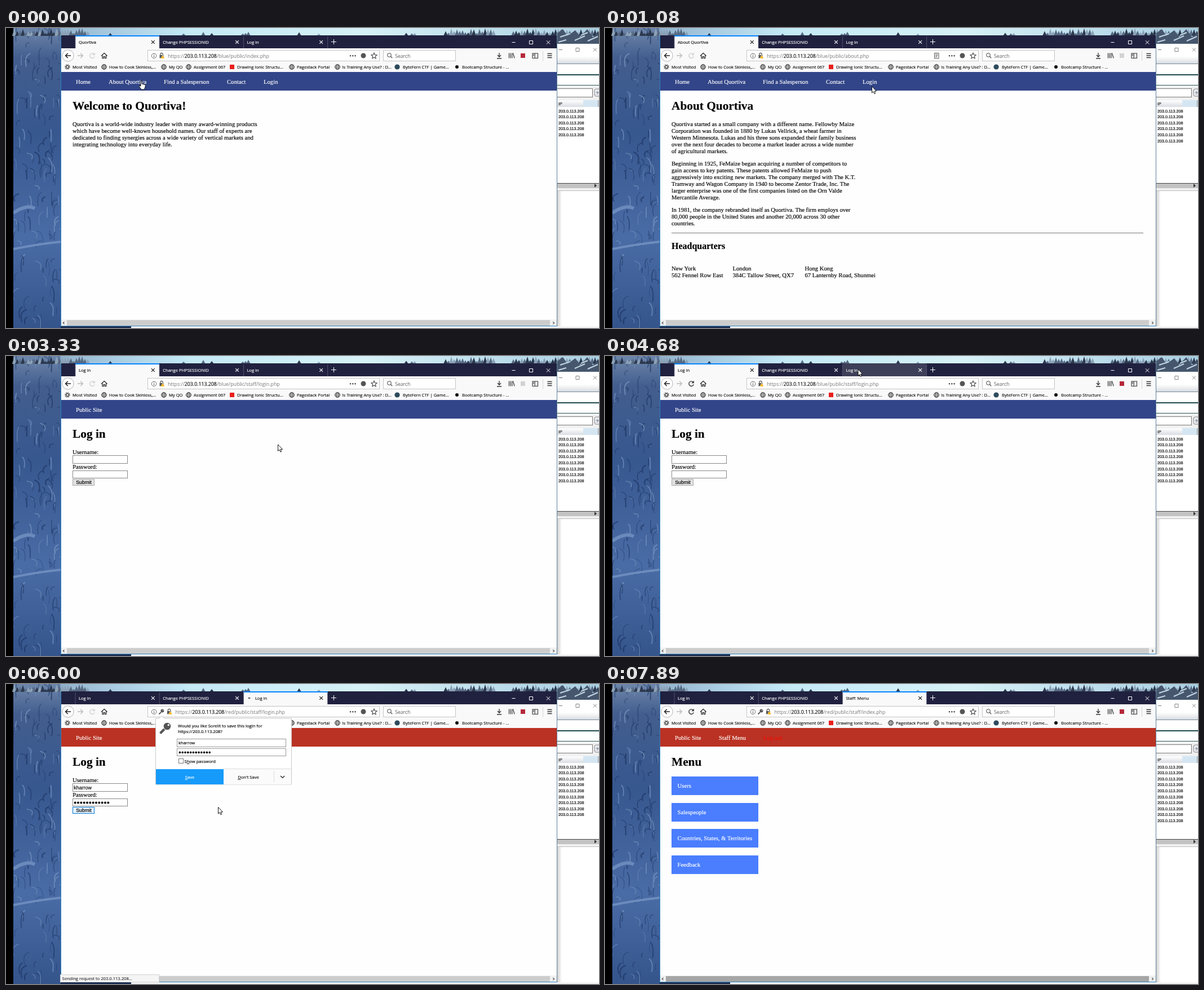
An HTML page that plays this animation: 1052 by 532 pixels, repeating every 8000 ms.

```html
<!DOCTYPE html>
<html lang="en">
<head>
<meta charset="utf-8">
<title>Browser session</title>
<style>
html, body { margin: 0; width: 100%; height: 100%; overflow: hidden; background: #000; }
svg { display: block; width: 1052px; height: 532px; }
text { white-space: pre; stroke-width: .16px; }
.ui { font: 7.6px "Open Sans", sans-serif; }
.url { font: 8.75px "Open Sans", sans-serif; }
.page { font: 10.67px "Liberation Serif", serif; }
.h1 { font: bold 21.33px "Liberation Serif", serif; }
.h2 { font: bold 16px "Liberation Serif", serif; }
.form { font: 8.89px "Liberation Sans", sans-serif; }
.row { font: 7.2px "Liberation Sans", sans-serif; }
</style>
</head>
<body>
<svg viewBox="0 0 1052 532" xmlns="http://www.w3.org/2000/svg">
  <defs>
    <linearGradient id="snow" x2="0" y2="1">
      <stop offset="0" stop-color="#6d86ab"/><stop offset=".1" stop-color="#435e8e"/>
      <stop offset=".35" stop-color="#37578f"/><stop offset=".7" stop-color="#4a6ca6"/>
      <stop offset="1" stop-color="#34548b"/>
    </linearGradient>
    <linearGradient id="sky">
      <stop offset="0" stop-color="#7e9bb8"/><stop offset=".15" stop-color="#a3c6dd"/>
      <stop offset=".3" stop-color="#c4eaf6"/><stop offset=".6" stop-color="#d6f1f7"/>
      <stop offset="1" stop-color="#a9cfe2"/>
    </linearGradient>
    <linearGradient id="head" x2="0" y2="1">
      <stop offset="0" stop-color="#fff"/><stop offset="1" stop-color="#d9dde2"/>
    </linearGradient>
    <linearGradient id="shade">
      <stop offset="0" stop-color="#cfcfcf"/><stop offset="1" stop-color="#fff"/>
    </linearGradient>
    <clipPath id="wood"><rect x="13" width="84" height="532"/></clipPath>
  </defs>
  <g id="back"></g>
  <g id="view"></g>
  <g id="cursor"></g>
</svg>
<script>
const LOOP = 8000, HOST = "203.0.113.208", BRAND = "Quortiva";
const $ = id => document.getElementById(id);

const rect = (x, y, w, h, fill, more = "") =>
  `<rect x="${x}" y="${y}" width="${w}" height="${h}" fill="${fill}" ${more}/>`;
const box = (x, y, w, h, fill, line) => rect(x, y, w, h, fill, `stroke="${line}" stroke-width="1"`);
const path = (d, line, width = 1, fill = "none") =>
  `<path d="${d}" fill="${fill}" stroke="${line}" stroke-width="${width}"/>`;
const disc = (x, y, r, fill, line = "none", width = 1) =>
  `<circle cx="${x}" cy="${y}" r="${r}" fill="${fill}" stroke="${line}" stroke-width="${width}"/>`;
const text = (cls, x, y, s, fill = "#000", more = "") =>
  `<text class="${cls}" x="${x}" y="${y}" fill="${fill}" stroke="${fill}" ${more}>${s}</text>`;
const cross = (x, y, r, line, width = 1.1) =>
  path(`M${x - r} ${y - r}l${2 * r} ${2 * r}m0 ${-2 * r}l${-2 * r} ${2 * r}`, line, width);
const lines = (x, y, list) => list.map((s, i) => text("page", x, y + i * 12, s)).join("");

// ---- desktop behind the browser
function random(seed) {
  return () => (seed = (seed * 16807) % 2147483647) / 2147483647;
}

function desktop() {
  const rnd = random(77), pick = list => list[Math.floor(rnd() * list.length)];
  let s = rect(13, 0, 1039, 532, "url(#sky)") + rect(13, 0, 84, 532, "url(#snow)");
  // snowy twigs
  s += '<g clip-path="url(#wood)" opacity=".55">';
  for (let i = 0; i < 150; i++) {
    const x = 10 + rnd() * 85, y = rnd() * 530 - 10, w = rnd() * 30 - 15, h = 6 + rnd() * 22;
    s += path(`M${x} ${y}q${w} ${h * .2} ${w * .6} ${h}`, pick(["#162a55", "#203a6c", "#86a2cc"]), .8 + rnd() * 1.4);
  }
  s += path("M13 392Q52 384 97 379", "#8ba8d4", 4) + path("M13 328q24-16 38-8", "#8ba8d4", 6) + "</g>";
  // tree tops
  for (let x = 15; x < 1052; x += 5) {
    const thick = x < 150 || x > 775 && x < 870 || x > 898;
    if (!thick && rnd() > .06) continue;
    const h = thick ? 5 + rnd() * 9 : 4 + rnd() * 4;
    s += path(`M${x - 4} 14L${x} ${14 - h}l4 ${h}z`, "none", 0, pick(["#2c394e", "#566a82", "#8ba1b6"]));
  }
  s += path("M978 28V9l10-7 8 12 14-10 9 12 12-14 10 14 11-8V28z", "none", 0, "#46576d");
  s += path("M983 16l18-6m8 12l18-8m5 9l18-8M980 25l14-4m26-8l12-5", "#c3d6e5", 2);

  // second window
  s += rect(978, 28, 74, 504, "#fff") + path("M981 38.5h6", "#777", 1) + path("M1011 35.5h6v6h-6z", "#777", .9) + cross(1045, 38.5, 3, "#777", .9);
  s += rect(978, 50, 74, 13, "url(#head)") + rect(978, 63, 74, 1, "#789") + rect(978, 82, 74, 2, "#1f4a4b");
  s += rect(978, 101, 74, 1, "#1f4a4b") + rect(978, 103, 74, 25, "#f0f0f0") + box(970.5, 107.5, 70, 15, "#fff", "#777");
  s += `<rect x="1044" y="108" width="14" height="13" rx="3" fill="#e8eaf0" stroke="#888"/>` + text("row", 1047, 118, "?", "#345");
  s += rect(978, 128, 74, 12, "url(#head)") + rect(1024, 128, 28, 12, "#d5e6f3") + path("M1050.5 128v12", "#999", 1);
  s += text("row", 980, 137, "IP", "#222") + rect(978, 275, 74, 1, "#444") + rect(978, 276, 74, 8, "#c3c3c3");
  s += path("M1044 276l4 3.5-4 3.5z", "none", 0, "#333") + rect(978, 284, 74, 4, "#f0f0f0") + rect(978, 288, 74, 1, "#bbb");
  return s + rect(978, 289, 8, 243, "url(#shade)") + rect(97, 529, 125, 3, "#1d2f52") + rect(222, 529, 830, 3, "#f3f3f3");
}

// ---- browser frame
const globe = x => disc(x, 69, 4.4, "none", "#333", 1) +
  `<ellipse cx="${x}" cy="69" rx="2" ry="4.4" fill="none" stroke="#333" stroke-width=".8"/>` +
  path(`M${x - 4.4} 69h8.8m-7.8-2.2h6.8m-6.8 4.4h6.8`, "#333", .7);
const gear = x => disc(x, 69, 2.4, "none", "#333", 1.2) +
  `<circle cx="${x}" cy="69" r="4" fill="none" stroke="#333" stroke-width="1.5" stroke-dasharray="1.4 1.74"/>`;
const square = x => rect(x - 4, 65, 8, 8, "#e8201c");

const BOOKMARKS = [
  [109, 118, "Most Visited", gear], [174, 183, "How to Cook Skinless,...", globe],
  [280, 289, "My QO", globe], [324, 333, "Assignment 067", globe],
  [401, 410, "Drawing Ionic Structu...", square], [507, 516, "Pagestack Portal", globe],
  [588, 596.5, "Is Training Any Use? : D...", globe],
  [694, 704, "ByteFern CTF | Game...", x => disc(x, 69, 4.6, "#2d4a5c")],
  [800, 809, "Bootcamp Structure - ...", x => disc(x, 69, 3, "#111")]
];

function tabs(v) {
  let s = rect(97, 13, 880, 23, "#20213f");
  v.titles.forEach((title, i) => {
    const x = 123 + i * 149.2, on = i === v.tab;
    if (on) s += rect(x, 13, 149, 23, "#f9f9fa") + rect(x, 13, 149, 2, "#0a84ff");
    else if (i === v.hover) s += rect(x, 13, 149, 23, "#3d3e58");
    const ink = on ? "#111" : "#fff", busy = on && v.busy;
    if (busy) s += `<rect x="${x + 8 + v.spin}" y="24" width="4" height="1.8" rx=".9" fill="#333"/>`;
    s += text("ui", x + (busy ? 20.5 : 6), 28, title, ink) + cross(x + 137.8, 25, 2.9, ink);
  });
  s += path("M123 15v21M272.2 15v21M421.4 15v21M570.6 15v21", "#5d5e79", .8);
  return s + path("M577 24.5h9m-4.5-4.5v9M897.5 25.5h6", "#fff", 1) +
    path("M928.5 22.5h6v6h-6z", "#fff", 1) + cross(962, 25.5, 3.2, "#fff", 1);
}

function reloadIcon(mode) {
  if (mode === "stop") return cross(153, 49, 4, "#333", 1.4);
  const c = mode === "dim" ? "#d0d0d2" : "#333";
  return path("M156.4 46.3A4.3 4.3 0 1 0 157.2 50.6", c, 1.4) + path("M157.8 43.8v4.4h-4.4z", "none", 0, c);
}

const keyIcon = (x, y, k) => `<g transform="translate(${x} ${y}) scale(${k})">` +
  path("M-1 1L-4.5 4.5", "#555", 2) + disc(1.4, -1.4, 3, "#555") + disc(2.5, -2.5, .8, "#fff") + "</g>";
const lockIcon = x => path(`M${x - 2.2} 48v-1.5a2.2 2.2 0 0 1 4.4 0V48`, "#555", 1.2) +
  rect(x - 3.5, 48, 7, 5.5, "#555") + path(`M${x + 2} 48l3.6 6h-7.2z`, "#fff", .4, "#f5b31a");

function toolbar(v) {
  let s = rect(97, 36, 880, 42, "#f9f9fa");
  s += disc(110, 49, 10.2, "#fff", "#b5b5b8", 1) + path("M115 49h-9.5m4.3-4.3L105.5 49l4.3 4.3", "#222", 1.5);
  s += path("M127 49h9.5m-4.3-4.3l4.3 4.3-4.3 4.3", "#bbb", 1.3) + reloadIcon(v.reload);
  s += path("M169 49.5l5.3-5 5.3 5M171 48.5v5.2h2.2v-3h2.3v3h2.2v-5.2", "#333", 1.3);
  s += box(251.5, 39.5, 411, 19, "#fff", "#c4c4c6") + box(669.5, 39.5, 128, 19, "#fff", "#c4c4c6");
  s += disc(262.5, 49.3, 4.2, "none", "#555", .9) + path("M262.5 48.5v3.2m0-5.2v1.1", "#555", 1.1);
  const shift = v.tab === 2 ? 13.5 : 0;
  if (shift) s += keyIcon(276, 49, 1);
  s += lockIcon(276 + shift);
  const grey = c => `<tspan fill="#777" stroke="none">${c}</tspan>`;
  s += text("url", 287 + shift, 53, grey("https://") + HOST + grey(v.path), "#0c0c0d");
  if (v.page === "about") s += path("M584.5 44.5h7.5v9.5h-7.5zM586 47h4.5m-4.5 2.2h4.5M586 51.4h3", "#555", 1);
  s += [611, 615.3, 619.6].map(x => disc(x, 49.2, 1.2, "#444")).join("") + disc(634, 49, 4.5, "#555");
  s += path("M653 44.2l1.5 3.3 3.6.4-2.7 2.4.8 3.6-3.2-1.9-3.2 1.9.8-3.6-2.7-2.4 3.6-.4z", "#444", 1.1);
  s += disc(680, 48, 3.2, "none", "#555", 1.1) + path("M682.3 50.3l3 3", "#555", 1.3) + text("url", 690, 53, "Search", "#777");
  s += path("M875 44v7m-3-3l3 3.2 3-3.2M871 54h8", "#333", 1.3);
  s += path("M892.5 44.5v9m2.7-9v9m2.7-9v9m1.6-9l2.6 9", "#333", 1.2);
  s += rect(913, 45, 8, 8, v.dimExt ? "#d2d2d4" : "#b5283a");
  s += path("M934 45h9.5v8.5H934zm4.2 0v8.5M935 47h2m-2 2h2", "#333", 1.1) + path("M952.5 41v17", "#ccc", .8);
  s += path("M960.5 45.5h8m-8 3.5h8m-8 3.5h8", "#333", 1.3);
  return s + BOOKMARKS.map(([x, tx, label, icon]) => icon(x) + text("ui", tx, 72, label, "#111")).join("");
}

function scrollbar(v) {
  return rect(97.5, 517, 879.5, 11.7, "#f0f0f0") + rect(108, 518, 857, 10, v.drag ? "#a6a6a6" : "#cdcdcd") +
    path("M103.5 520.8l-2.3 2.2 2.3 2.2M970.3 520.8l2.3 2.2-2.3 2.2", "#444", 1.1);
}

// ---- pages
const BLUE = "#324588", RED = "#ba3223";
const menuBar = (color, items) => rect(97, 78, 880, 33, color) +
  items.map(([x, s, c = "#fff"]) => text("page", x, 99, s, c)).join("");
const site = () => menuBar(BLUE, [[124, "Home"], [182, "About " + BRAND], [280, "Find a Salesperson"], [392, "Contact"], [457, "Login"]]);
const title = s => text("h1", 118, 145, s);

const PAGES = {
  home: () => site() + title(`Welcome to ${BRAND}!`) + lines(118, 174, [
    BRAND + " is a world-wide industry leader with many award-winning products",
    "which have become well-known household names. Our staff of experts are",
    "dedicated to finding synergies across a wide variety of vertical markets and",
    "integrating technology into everyday life."]),

  about: () => site() + title("About " + BRAND) + lines(118, 174, [
    BRAND + " started as a small company with a different name. Fellowby Maize",
    "Corporation was founded in 1880 by Lukas Vellrick, a wheat farmer in",
    "Western Minnesota. Lukas and his three sons expanded their family business",
    "over the next four decades to become a market leader across a wide number",
    "of agricultural markets."]) + lines(118, 244, [
    "Beginning in 1925, FeMaize began acquiring a number of competitors to",
    "gain access to key patents. These patents allowed FeMaize to push",
    "aggressively into exciting new markets. The company merged with The K.T.",
    "Tramway and Wagon Company in 1940 to become Zentor Trade, Inc. The",
    "larger enterprise was one of the first companies listed on the Orn Valde",
    "Mercantile Average."]) + lines(118, 326, [
    `In 1981, the company rebranded itself as ${BRAND}. The firm employs over`,
    "80,000 people in the United States and another 20,000 across 30 other",
    "countries."]) + rect(118, 363, 837, 1, "#777") + text("h2", 118, 392, "Headquarters") +
    lines(118, 430, ["New York", "562 Fennel Row East"]) +
    lines(226.5, 430, ["London", "384C Tallow Street, QX7"]) +
    lines(354.5, 430, ["Hong Kong", "67 Lanternby Road, Shunmei"]),

  login: v => {
    const red = v.tab === 2;
    let s = menuBar(red ? RED : BLUE, [[124, "Public Site"]]) + title("Log in");
    s += text("page", 118, 174, "Username:") + text("page", 118, 200, "Password:");
    s += box(118.5, 176.5, 97, 14, "#fff", "#888") + box(118.5, 203.5, 97, 13, "#fff", "#888");
    if (red) s += text("form", 120.3, 187, "kharrow") + dots(122.7, 210.5, 5.33);
    s += box(118.5, 218.5, 38, 11, v.focus ? "#e3f0fb" : "#e1e1e1", v.focus ? "#0078d7" : "#adadad");
    return s + text("form", 138, 227, "Submit", "#000", 'text-anchor="middle"');
  },

  menu: () => menuBar(RED, [[124, "Public Site"], [202, "Staff Menu"], [281, "Log out", "#f01008"]]) + title("Menu") +
    ["Users", "Salespeople", "Countries, States, &amp; Territories", "Feedback"].map((s, i) => {
      const y = Math.round(164 + i * 46.5);
      return rect(118, y, 154, 33, "#4a7eff") + text("page", 128.6, y + 20, s, "#fff");
    }).join("")
};

function dots(x, y, gap) {
  let s = "";
  for (let i = 0; i < 12; i++) s += disc(x + i * gap, y, gap * .37, "#000");
  return s;
}

function savePrompt() {
  const u = c => `<tspan text-decoration="underline">${c}</tspan>`;
  return path("M265.5 61h5.5l5-4.5 5 4.5h225.5v117H265.5z", "#c2c2c2", .9, "#fff") + keyIcon(283, 78, 2.1) +
    text("ui", 305, 77, "Would you like Sorelit to save this login for") + text("ui", 305, 87, `https://${HOST}?`) +
    box(303.5, 97.5, 193, 14, "#fff", "#999") + box(303.5, 114.5, 193, 13, "#fff", "#999") +
    text("ui", 306, 107, "kharrow") + dots(308.4, 121.4, 4.8) +
    box(306.5, 132.5, 8, 8, "#fff", "#777") + text("ui", 316.5, 140, `S${u("h")}ow password`) +
    rect(266, 151, 120, 27, "#169bfa") + rect(386, 151, 120, 27, "#fbfbfb") + path("M386 150.5h120M475.5 154v20", "#ddd", 1) +
    text("ui", 326, 168, u("S") + "ave", "#fff", 'text-anchor="middle"') +
    text("ui", 430, 168, u("D") + "on't Save", "#111", 'text-anchor="middle"') + path("M487 163l3.6 3.4 3.6-3.4", "#222", 1.4);
}

const status = s => box(96.5, 515.5, 175, 13, "#f5f5f6", "#d2d2d4") + text("ui", 99.5, 525, s, "#333");

// ---- timeline: [first, last, count] of picture changes
const STEPS = [[130, 1080, 6], [1210, 1480, 3], [1760, 1760, 1], [2040, 3060, 9], [3210, 4110, 8],
  [4260, 5180, 8], [5330, 5600, 3], [5880, 6910, 9], [7050, 7890, 7]]
  .flatMap(([a, b, n]) => Array.from({ length: n }, (_, i) => n > 1 ? a + (b - a) * i / (n - 1) : a));
const held = t => STEPS.reduce((best, s) => s <= t + 15 ? s : best, 0);

const POINTER = [[0, 240, 94], [510, 241, 94], [890, 440, 106], [1080, 473.5, 103.5], [1345, 470, 97], [1480, 469, 94],
  [2430, 469, 94], [3060, 481, 150], [3210, 482.5, 157], [3345, 482.5, 157], [3850, 462, 70], [4110, 452, 29],
  [4400, 449, 23.5], [4790, 449, 23.5], [5050, 215, 200], [5180, 140, 258], [5330, 140, 246], [5600, 139, 222],
  [5880, 141, 222], [6000, 376.5, 218.5], [6150, 376.5, 218.5], [6450, 430, 167], [6660, 430, 167],
  [6910, 425, 212], [7050, 424, 221.5], [7200, 424, 221.5], [7620, 430, 514]];

function pointerAt(t) {
  const i = POINTER.findIndex(k => k[0] > t);
  if (i < 0) return POINTER[POINTER.length - 1].slice(1);
  const [t0, x0, y0] = POINTER[i - 1], [t1, x1, y1] = POINTER[i];
  const p = (t - t0) / (t1 - t0), e = p * p * (3 - 2 * p);
  return [x0 + (x1 - x0) * e, y0 + (y1 - y0) * e];
}

function stateAt(t) {
  const within = (a, b) => t >= a && t < b;
  const [x, y] = pointerAt(t);
  const page = t < 500 ? "home" : t < 2415 ? "about" : t < 7460 ? "login" : "menu";
  const red = t >= 4780;
  const busy = within(130, 500) || within(2040, 2415) || within(5870, 7460);
  const dim = [[0, 130], [500, 1210], [2415, 3460], [5870, 6260], [7460, 7740]].some(([a, b]) => within(a, b));
  const first = page === "home" ? BRAND : page === "about" ? "About " + BRAND : "Log in";
  const file = { home: "index", about: "about", login: "staff/login", menu: "staff/index" }[page];
  return {
    x, y, page, busy, tab: red ? 2 : 0,
    spin: 4 * Math.abs(Math.sin((t - 6000) * Math.PI / 1050)),
    titles: [first, "Change PHPSESSIONID", page === "menu" ? "Staff: Menu" : "Log in"],
    hover: y < 36 ? Math.floor((x - 123) / 149.2) : -1,
    path: `/${red ? "red" : "blue"}/public/${file}.php`,
    reload: dim ? "dim" : busy ? "stop" : "go",
    dimExt: within(130, 1210) || within(2040, 3460),
    focus: within(5450, 6500),
    prompt: within(5870, 6640),
    drag: t >= 7600,
    rows: 5 + [310, 2160, 2415, 5870, 6640].filter(k => t >= k).length,
    status: within(1760, 2040) ? `https://${HOST}/blue/public/staff/login.php` :
      within(5870, 6130) ? `Sending request to ${HOST}...` : busy ? `Waiting for ${HOST}...` : "",
    hand: t < 500 || within(1470, 2415)
  };
}

function draw(v) {
  let s = "";
  for (let i = 0; i < v.rows; i++) s += text("row", 980, Math.round(149.6 + i * 10.6), HOST, "#000");
  s += rect(97, 13, 880, 516, "#fefefe") + tabs(v) + toolbar(v) + PAGES[v.page](v) + scrollbar(v);
  s += path("M97.5 13V528.5H977", "#2f83c4", 1) + path("M977.5 13V529", "#5f7f9c", 1);
  if (v.status) s += status(v.status);
  if (v.prompt) s += savePrompt();
  $("view").innerHTML = s;
  $("cursor").innerHTML = v.drag ? "" : `<g transform="translate(${v.x} ${v.y})">` + (v.hand
    ? path("M-1 .6Q0-1 1 .6V5l5.2 1.2Q7.5 6.8 7.3 8.6L6.6 12 5.2 15H0L-4 9.2Q-3.6 7.4-1 9.2z", "#000", .9, "#fff")
    : path("M0 0V11.5L2.6 9.2 4.4 13.2 6.2 12.4 4.5 8.5H8z", "#000", .9, "#fff")) + "</g>";
}

$("back").innerHTML = desktop();
let shown = -1;
function tick() {
  const t = held(performance.now() % LOOP);
  if (t !== shown) draw(stateAt(shown = t));
  requestAnimationFrame(tick);
}
tick();
</script>
</body>
</html>
```
